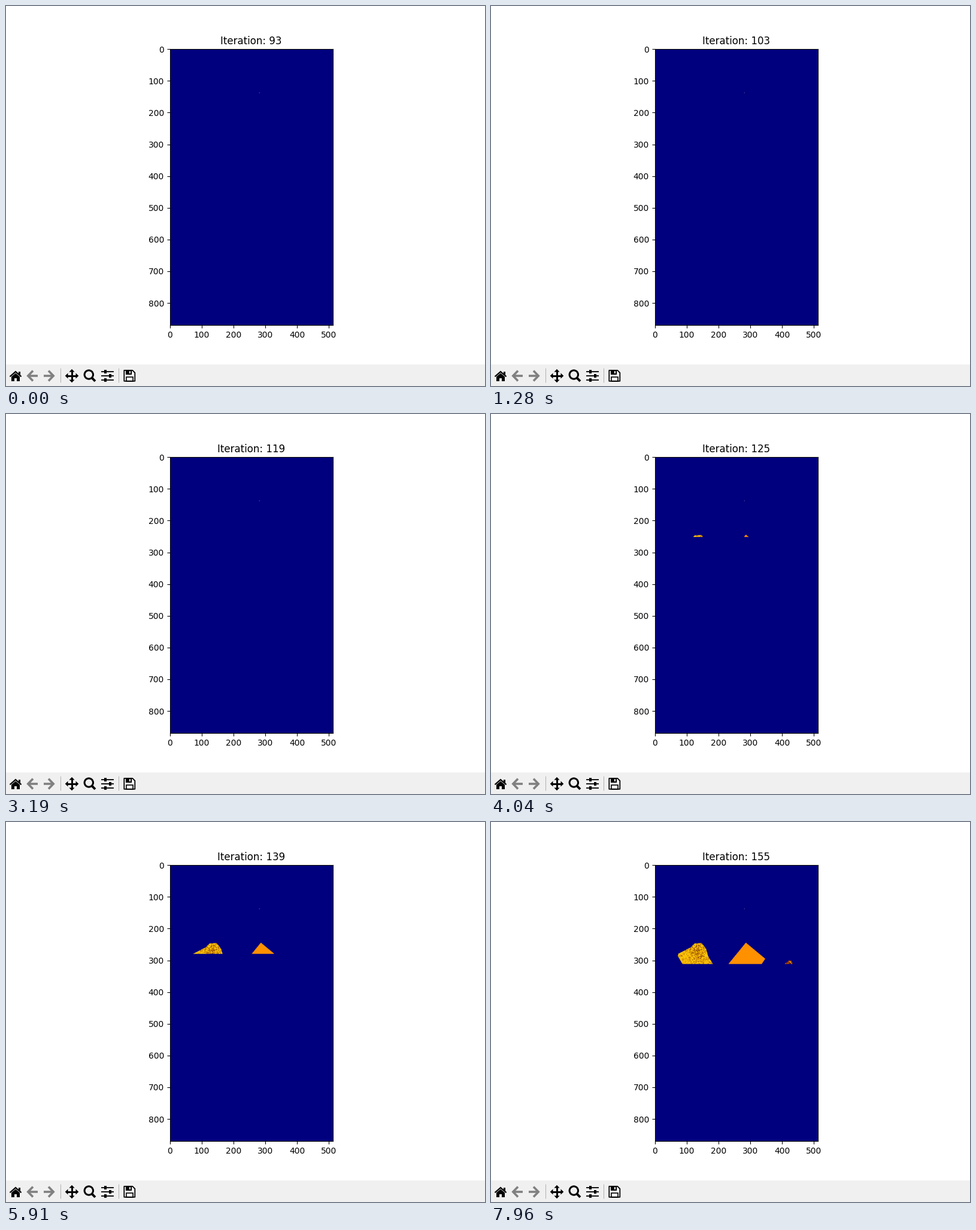
These frames come from a looping animation (800x636 px, 8000 ms). A matplotlib script:

```python
import numpy as np
import matplotlib.pyplot as plt
from matplotlib.animation import FuncAnimation
from matplotlib.patches import Circle, Polygon, Rectangle
from matplotlib.path import Path

W, H, BAR = 800, 636, 36
ROWS, COLS = 870, 512
STEP_MS, FRAMES = 40, 200
PAPER, BAR_COLOR, INK, FADED = "white", "#f0f0f0", "black", "#808080"
NAVY = (0, 0, 127)

# the scan counts steadily, stalls briefly, then runs a little slower
FIRST, LAST_BEFORE_STALL, STALL_END = 93, 119, 3400
PACE, SLOW_PACE = 122, 128.5  # ms per iteration

plt.rcParams["font.family"] = "DejaVu Sans"
fig = plt.figure(figsize=(W / 100, H / 100), dpi=100, facecolor=PAPER)


# ---- scanned picture -------------------------------------------------
rng = np.random.default_rng(7)
yy, xx = np.mgrid[0:ROWS, 0:COLS]
points = np.column_stack([xx.ravel(), yy.ravel()])


def inside(*outline):
    return Path(outline).contains_points(points).reshape(ROWS, COLS)


def grain(size=2):
    """Uniform noise in square cells of the given size."""
    cells = rng.random((ROWS // size + 1, COLS // size + 1))
    return cells.repeat(size, 0).repeat(size, 1)[:ROWS, :COLS]


def build_scene():
    scene = np.full((ROWS, COLS, 3), NAVY, np.uint8)

    rock = inside((124, 247), (146, 245), (160, 264), (167, 288), (183, 314),
                  (87, 314), (71, 286), (73, 279), (113, 258))
    core = np.exp(-((xx - 135) ** 2 + (yy - 275) ** 2) / 24 ** 2)
    tint = grain()
    scene[rock] = (248, 188, 4)
    scene[rock & (tint > 0.6)] = (255, 206, 10)
    scene[rock & (tint < 0.25)] = (226, 152, 6)
    scene[rock & (grain() < 0.08 + 0.34 * core)] = (140, 66, 6)

    wedge = inside((285, 244), (346, 295), (333, 314), (228, 314))
    scene[wedge] = (255, 144, 0)

    chip = inside((404, 314), (420, 300), (428, 301), (434, 314))
    shade = grain()
    scene[chip] = (120, 30, 10)
    scene[chip & (shade > 0.5)] = (205, 110, 8)
    scene[chip & (shade > 0.78)] = (250, 206, 30)

    scene[137:139, 280:282] = (120, 120, 140)
    return scene


scene = build_scene()
blank = np.full_like(scene, NAVY)

ax = fig.add_axes([99.6 / W, 102 / H, 620 / W, 462 / H])
picture = ax.imshow(blank)
ax.set_xticks(range(0, COLS, 100))
ax.set_yticks(range(0, ROWS, 100))
title = ax.set_title("")


# ---- toolbar ---------------------------------------------------------
bar = fig.add_axes([0, 0, 1, BAR / H])
bar.set(xlim=(0, W), ylim=(H, H - BAR))
bar.axis("off")


def box(x, y, w, h, color=INK):
    bar.add_patch(Rectangle((x, y), w, h, fc=color, ec="none"))


def line(xs, ys, width, color=INK):
    bar.plot(xs, ys, color=color, lw=width * 0.72, solid_capstyle="butt",
             solid_joinstyle="miter")


def draw_home(cx=16):
    line([cx - 9.5, cx, cx + 9.5], [620.3, 612, 620.3], 2.2)
    box(cx + 4.5, 611.5, 3, 6)
    bar.add_patch(Polygon([(cx - 7, 620.5), (cx, 614.5), (cx + 7, 620.5),
                           (cx + 7, 628), (cx - 7, 628)], fc=INK, ec="none"))
    box(cx - 2, 622.5, 4, 5.5, BAR_COLOR)


def draw_arrow(tip, way):
    line([tip + way * 10, tip + way * 1.8, tip + way * 10],
         [610.5, 619, 627.5], 3.6, FADED)
    line([tip + way * 2, tip + way * 18], [619, 619], 3.6, FADED)


def draw_pan(cx=110, cy=619):
    center = np.array([cx, cy])
    for dx, dy in [(1, 0), (-1, 0), (0, 1), (0, -1)]:
        out, side = np.array([dx, dy]), 4.6 * np.array([dy, dx])
        line([cx, cx + 8 * dx], [cy, cy + 8 * dy], 3)
        neck = center + 6.5 * out
        bar.add_patch(Polygon([center + 11.3 * out, neck + side, neck - side],
                              fc=INK, ec="none"))


def draw_zoom(cx=138.3, cy=617):
    bar.add_patch(Circle((cx, cy), 7.2, fill=False, ec=INK, lw=2.16))
    line([cx + 5.2, cx + 10.7], [cy + 5.4, cy + 11], 3.8)


def draw_sliders(left=159):
    for row, knob in enumerate([7, 15, 7]):
        y = 612 + 7 * row
        line([left, left + 21], [y, y], 1.8)
        box(left + knob - 4, y - 3, 8, 6, BAR_COLOR)
        box(left + knob - 2.2, y - 2.6, 4.4, 5.2)


def draw_save(x=197.3, y=609.8, size=18):
    bar.add_patch(Polygon([(x, y), (x + size - 4, y), (x + size, y + 4),
                           (x + size, y + size), (x, y + size)], fill=False,
                          ec=INK, lw=1.3, joinstyle="round"))
    box(x + 2.7, y, 10, 7)
    box(x + 8.5, y + 1.4, 2.4, 4.2, BAR_COLOR)
    bar.add_patch(Rectangle((x + 3.7, y + 11), 10.5, 7, fill=False, ec=INK,
                            lw=1.15))


box(0, H - BAR, W, BAR, BAR_COLOR)
draw_home()
draw_arrow(35, 1)
draw_arrow(81, -1)
for sep in (90.5, 187.5):
    line([sep, sep], [606, 630], 1, "#b0b0b0")
draw_pan()
draw_zoom()
draw_sliders()
draw_save()


# ---- motion ----------------------------------------------------------
def iteration(t):
    if t < STALL_END:
        return min(FIRST + int(t / PACE), LAST_BEFORE_STALL)
    return LAST_BEFORE_STALL + 1 + int((t - STALL_END) / SLOW_PACE)


def update(frame):
    count = iteration((frame + 0.5) * STEP_MS)
    edge = 2 * count + 2
    picture.set_data(np.vstack([scene[:edge], blank[edge:]]))
    title.set_text(f"Iteration: {count}")
    return picture, title


anim = FuncAnimation(fig, update, frames=FRAMES, interval=STEP_MS,
                     init_func=lambda: update(0), repeat=True, repeat_delay=0)
plt.show()
```
